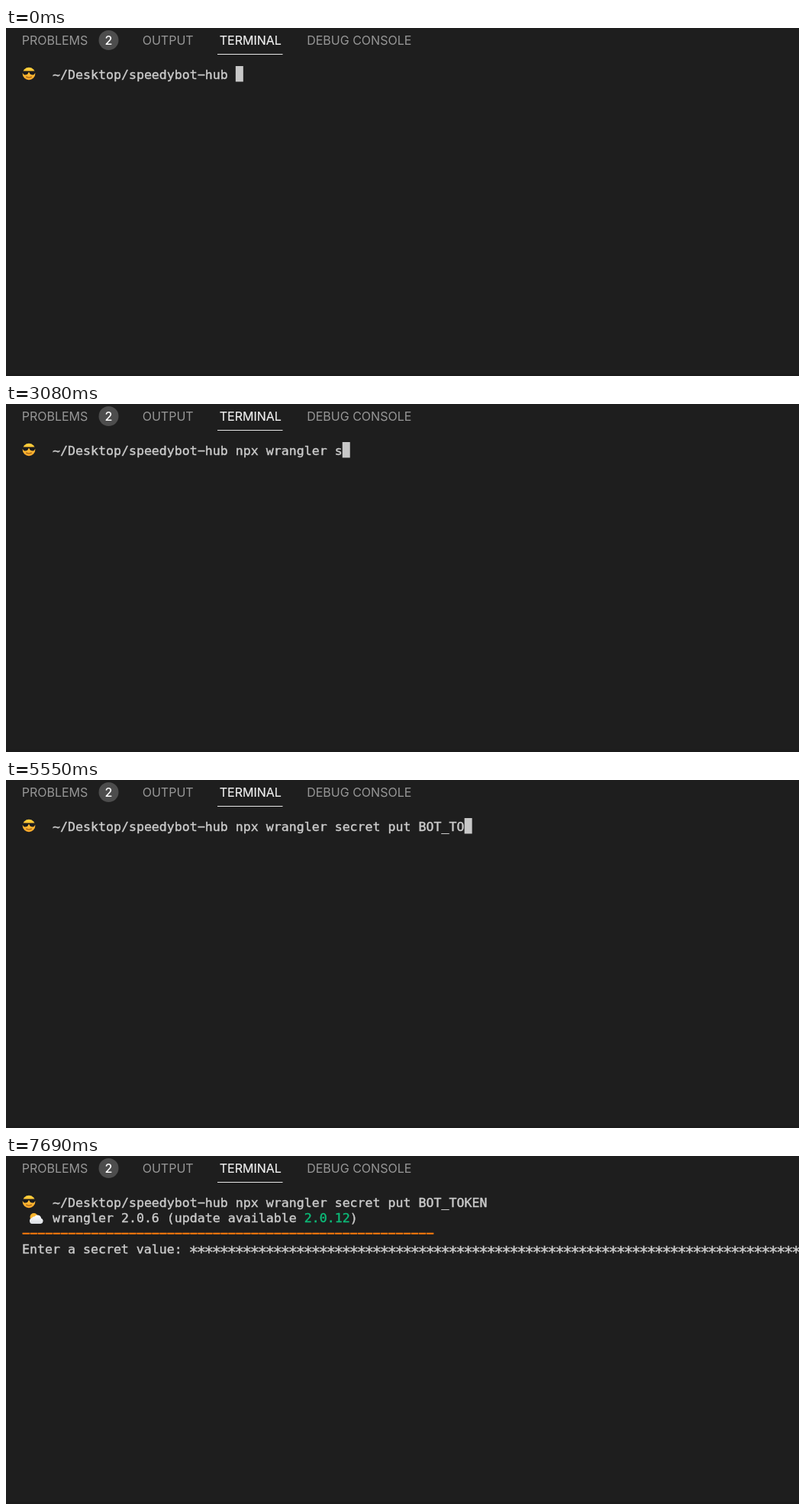
Animation, 1039 px wide and 457 px high, one loop 8 s. Source, as an HTML page:

```html
<!DOCTYPE html>
<html lang="en">
<head>
<meta charset="utf-8">
<title>Terminal</title>
<style>
  html, body { margin: 0; width: 100%; height: 100%; overflow: hidden; background: #1e1e1e; }
  svg { display: block; width: 1039px; height: 457px; }
  text { white-space: pre; }
  .tabs { font: 16px Inter, sans-serif; fill: #979797; }
  .tabs .active { fill: #efefef; stroke: #efefef; stroke-width: .2; }
  .tabs .count { fill: #fff; font-weight: 500; }
  .term { font: 16.6px "DejaVu Sans Mono", monospace; }
  .term text { fill: #ccc; stroke: #ccc; stroke-width: .4; }
  .term .version { fill: #0dbc79; stroke: #0dbc79; }
  .term #divider { fill: #fb7a0c; stroke: #fb7a0c; stroke-width: .8; }
  #secret { font-size: 21px; letter-spacing: -2.65px; }
</style>
</head>
<body>
<svg viewBox="0 0 1039 457">
  <defs>
    <linearGradient id="face" x2="0" y2="1">
      <stop stop-color="#ffd23c"/><stop offset="1" stop-color="#fba52a"/>
    </linearGradient>
    <linearGradient id="cloud" x2="0" y2="1">
      <stop stop-color="#fff"/><stop offset="1" stop-color="#d9dde2"/>
    </linearGradient>
  </defs>
  <rect y="454" width="1039" height="3" fill="#1b1b1b"/>

  <g class="tabs">
    <text x="20.7" y="21.7">PROBLEMS</text>
    <circle cx="134.5" cy="16" r="13" fill="#4d4d4d"/>
    <text class="count" x="134.5" y="21.5" text-anchor="middle">2</text>
    <text x="178.7" y="21.7">OUTPUT</text>
    <text class="active" x="279.7" y="21.7">TERMINAL</text>
    <rect x="277" y="34" width="85.5" height="1" fill="#e7e7e7"/>
    <text x="394.2" y="21.7">DEBUG CONSOLE</text>
  </g>

  <g class="term">
    <circle cx="30" cy="60" r="8.3" fill="url(#face)"/>
    <path d="M21.6 56.4h16.8v1.5q-.8 3.6-3.9 3.6-3.1 0-3.9-3.2h-1.2q-.8 3.2-3.9 3.2-3.1 0-3.9-3.6z" fill="#1b1b1d"/>
    <path d="M26.5 64.2q3.5 2.2 7 0" fill="none" stroke="#8a4d14" stroke-linecap="round"/>
    <text id="command" x="61" y="67"></text>

    <g id="banner">
      <circle cx="36.5" cy="80" r="5" fill="#fbb52c"/>
      <path d="M34 89a3.8 3.8 0 0 1-.2-7.4 3.6 3.6 0 0 1 3.6-2.2 5 5 0 0 1 8.8 2.5A3.7 3.7 0 0 1 45.5 89z" fill="url(#cloud)"/>
      <text x="61" y="87.3">wrangler 2.0.6 (update available <tspan class="version">2.0.12</tspan>)</text>
      <text id="divider" x="21" y="107.3"></text>
    </g>
    <text id="prompt" x="21" y="128.3">Enter a secret value: </text>
    <text id="secret" x="239.6" y="133.6"></text>
    <rect id="cursor" width="10" height="20.5" fill="#c8c8c8"/>
  </g>
</svg>
<script>
const LOOP = 8000, COL = 9.994, LEFT = 21, TOP = 50, ROW = 20.4;
const path = "~/Desktop/speedybot\u2212hub ";
const typed = "npx wrangler secret put BOT_TOKEN";
// When each character of the command appears, in ms
const keys = [410, 590, 770, 1430, 1550, 1650, 1750, 1850, 1950, 2130, 2490,
  2670, 2900, 3080, 3430, 3550, 3790, 3960, 4020, 4260, 4430, 4550, 4600,
  4780, 4960, 5080, 5200, 5320, 5490, 5550, 5730, 5850, 5900];
const ENTER = 6260, BANNER = 6790, PROMPT = 6970, PASTE = 7690;

const el = id => document.getElementById(id);
const show = (id, on) => el(id).setAttribute("visibility", on ? "visible" : "hidden");

el("divider").textContent = "\u2212".repeat(54);
el("secret").textContent = "*".repeat(80);

function cursorCell(t, count) {
  if (t < ENTER) return [4 + path.length + count, 0];
  if (t < BANNER) return [0, 1];
  return [t < PROMPT ? 0 : 22, 3];
}

let lastCount = -1;
function draw(now) {
  const t = now % LOOP;
  const count = keys.filter(k => k <= t).length;
  if (count !== lastCount) el("command").textContent = path + typed.slice(0, count);
  lastCount = count;

  show("banner", t >= BANNER);
  show("prompt", t >= PROMPT);
  show("secret", t >= PASTE);
  show("cursor", t < PASTE);

  const [col, row] = cursorCell(t, count);
  el("cursor").setAttribute("x", LEFT + col * COL);
  el("cursor").setAttribute("y", TOP + row * ROW);
}

const start = performance.now();
function tick() {
  draw(performance.now() - start);
  requestAnimationFrame(tick);
}
tick();
</script>
</body>
</html>
```
